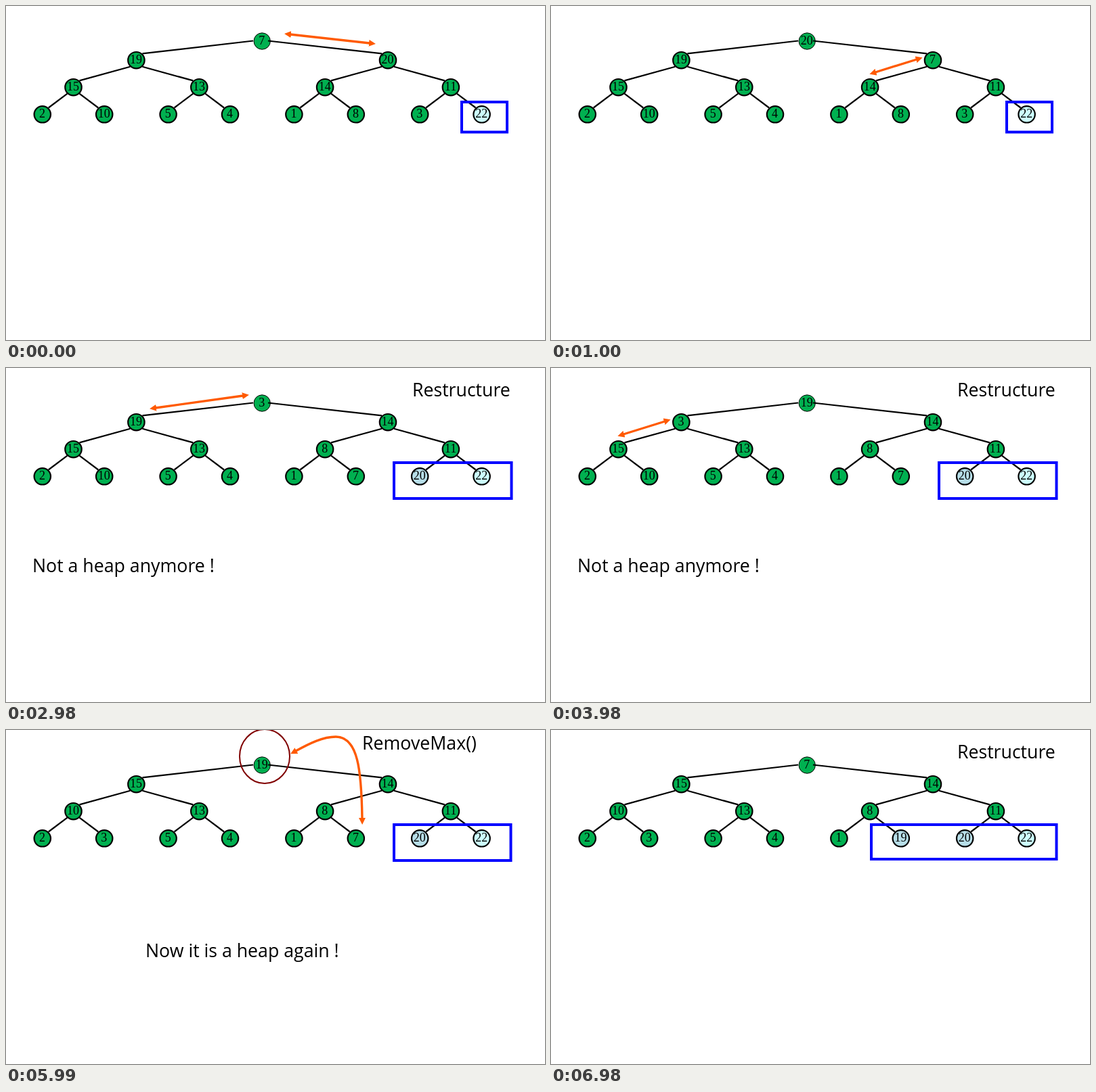
An HTML page for the animation above (7990 ms loop, 796 px wide and 494 px high).

```html
<!DOCTYPE html>
<html lang="en">
<head>
<meta charset="utf-8">
<title>Heap sort</title>
<style>
  html, body { margin: 0; width: 100%; height: 100%; overflow: hidden; background: #fff; }
  svg { display: block; width: 796px; height: 494px; }
  .edge { stroke: #000; stroke-width: 2.2; }
  .node { stroke: #000; stroke-width: 2.2; }
  .root { stroke-width: 1; }
  .value { font: 18px "Liberation Serif", serif; text-anchor: middle; }
  .label { font: 26.7px "Comic Sans MS", "Open Sans", sans-serif; }
  .arrow { fill: none; stroke: #ff5a00; stroke-width: 3.4; marker-start: url(#head); marker-end: url(#head); }
  .sorted { fill: none; stroke: #00f; stroke-width: 4; }
  .ring { fill: none; stroke: #800000; stroke-width: 2; }
</style>
</head>
<body>
<svg viewBox="0 0 796 494">
  <defs>
    <marker id="head" markerUnits="userSpaceOnUse" markerWidth="10" markerHeight="10"
            refX="1" refY="5" orient="auto-start-reverse">
      <path d="M0 0L10 5L0 10Z" fill="#ff5a00"/>
    </marker>
  </defs>
  <g id="stage"></g>
</svg>
<script>
const LOOP = 7990;
const GREEN = '#00b050', NEWLY_SORTED = '#b7dee8', FIRST_SORTED = '#ccffff';
const ROW_Y = [52, 80.2, 120.2, 160.3];
const ROW_SPREAD = [0, 185.8, 92.9, 45.7];

const nodes = [{ x: 378.2, y: ROW_Y[0] }];
for (let i = 1; i < 15; i++) {
  const row = Math.floor(Math.log2(i + 1));
  const side = i % 2 ? -1 : 1;
  nodes.push({ x: nodes[(i - 1) >> 1].x + side * ROW_SPREAD[row], y: ROW_Y[row] });
}

const notHeap = [['Restructure', 600, 42], ['Not a heap anymore !', 39, 302]];

// Each step applies its swaps to the heap left by the step before.
const steps = [
  { at: 0, swaps: [], sorted: 1, box: [673, 142, 740, 186.5],
    arrow: 'M420 42L537 55' },
  { at: 1000, swaps: [[0, 2]], sorted: 1, box: [673, 142, 740, 186.5],
    arrow: 'M479 98L540 79' },
  { at: 1980, swaps: [[2, 5], [5, 12]], sorted: 1, box: [665, 142, 740, 193], ring: true,
    arrow: 'M428 32C475 20 515 10 550 10C588 10 614 45 619 131',
    labels: [['RemoveMax()', 546, 29],
             ['Now the part heap is smaller, the part Sequence', 33, 322],
             ['contains a single element.', 33, 355]] },
  { at: 2980, swaps: [[0, 13]], sorted: 2, box: [573, 140, 746.5, 193],
    arrow: 'M221 59L350 41', labels: notHeap },
  { at: 3980, swaps: [[0, 1]], sorted: 2, box: [573, 140, 746.5, 193],
    arrow: 'M107 98L168 79', labels: notHeap },
  { at: 4980, swaps: [[1, 3]], sorted: 2, box: [573, 140, 746.5, 193],
    arrow: 'M118.5 119.3L132.5 132.7', labels: notHeap },
  { at: 5990, swaps: [[3, 8]], sorted: 2, box: [573, 140, 745.5, 193], ring: true,
    arrow: 'M428 31C448 20 468 10 487 10C520 10 525 60 526 131',
    labels: [['RemoveMax()', 526, 29], ['Now it is a heap again !', 206, 336]] },
  { at: 6980, swaps: [[0, 12]], sorted: 3, box: [473, 140, 746.5, 191],
    labels: [['Restructure', 600, 42]] }
];

function edge(i) {
  const child = nodes[i], parent = nodes[(i - 1) >> 1];
  const side = i % 2 ? -1 : 1;
  let x = parent.x + 9 * side, y = parent.y + 9.5;
  if (i < 3) {
    x = i === 1 ? 365 : 387;
    y = 51.5;
  }
  return `<line class="edge" x1="${x}" y1="${y}" x2="${child.x - 9 * side}" y2="${child.y - 9.8}"/>`;
}

function circle({ x, y }, i, sorted) {
  const fill = i < 15 - sorted ? GREEN : i === 14 ? FIRST_SORTED : NEWLY_SORTED;
  return `<circle class="node ${i ? '' : 'root'}" cx="${x}" cy="${y}" r="12.2" fill="${fill}"/>`;
}

const text = (kind, [content, x, y]) => `<text class="${kind}" x="${x}" y="${y}">${content}</text>`;

function draw(heap, { sorted, box: [x1, y1, x2, y2], ring, arrow, labels = [] }) {
  return [
    ...nodes.map((node, i) => circle(node, i, sorted)),
    ...nodes.slice(1).map((_, i) => edge(i + 1)),
    ...nodes.map(({ x, y }, i) => text('value', [heap[i], x - 0.4, y + 4.5])),
    `<rect class="sorted" x="${x1}" y="${y1}" width="${x2 - x1}" height="${y2 - y1}"/>`,
    ring ? '<ellipse class="ring" cx="382" cy="39" rx="37" ry="40"/>' : '',
    arrow ? `<path class="arrow" d="${arrow}"/>` : '',
    ...labels.map(label => text('label', label))
  ].join('');
}

const heap = [7, 19, 20, 15, 13, 14, 11, 2, 10, 5, 4, 1, 8, 3, 22];
const pictures = steps.map(step => {
  for (const [a, b] of step.swaps) [heap[a], heap[b]] = [heap[b], heap[a]];
  return draw(heap, step);
});

const stage = document.getElementById('stage');
let shown = -1;

function tick() {
  const time = performance.now() % LOOP;
  const current = steps.filter(step => step.at <= time).length - 1;
  if (current !== shown) {
    stage.innerHTML = pictures[current];
    shown = current;
  }
  requestAnimationFrame(tick);
}
tick();
</script>
</body>
</html>
```
